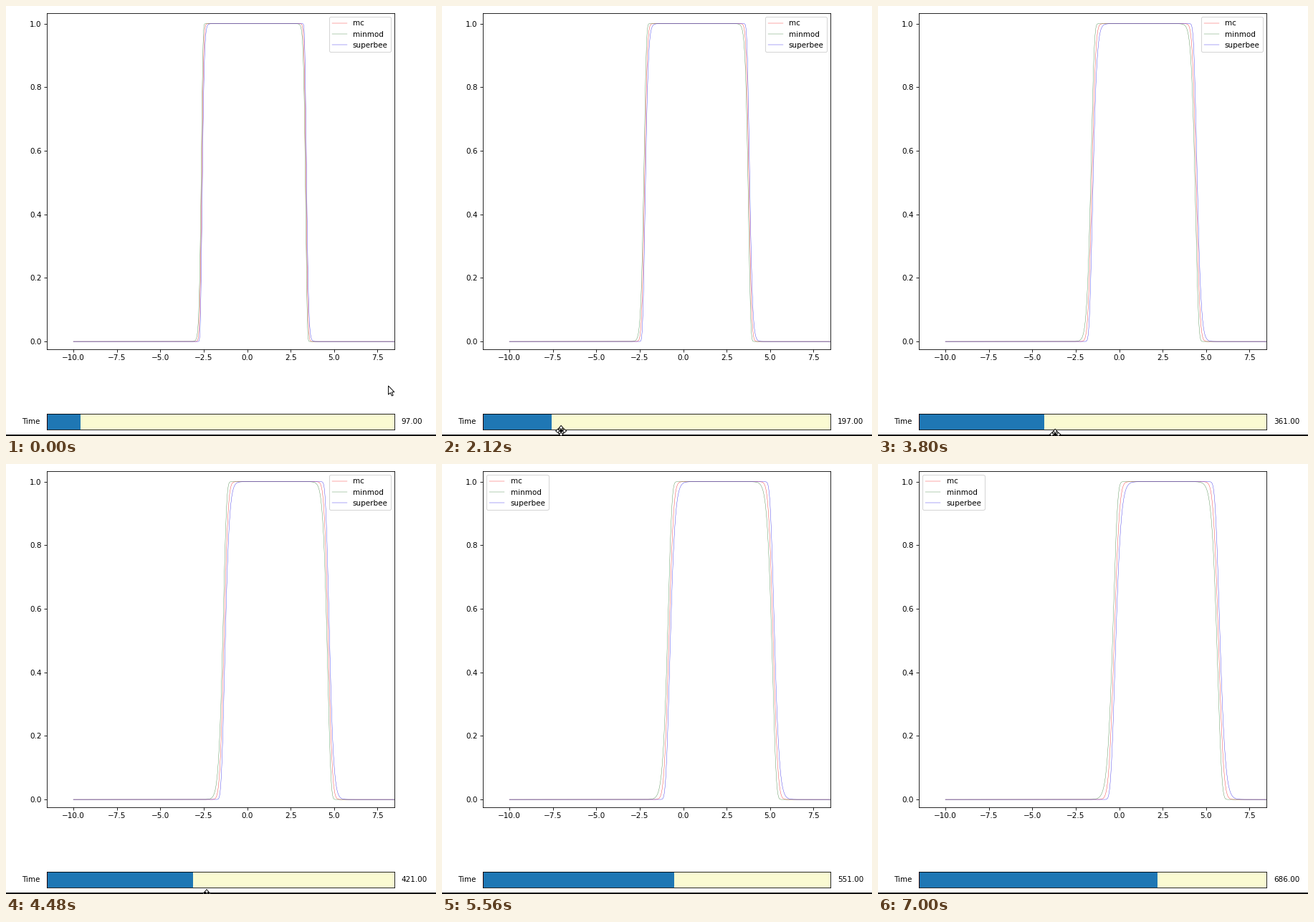
These frames come from a looping animation (600 px wide and 600 px high, 7080 ms). A matplotlib script:

```python
import numpy as np
import matplotlib.pyplot as plt
from matplotlib.animation import FuncAnimation
from matplotlib.patches import Polygon, Rectangle

STEP = 40
FRAMES = 177
SIZE = 600
GRAB, DRAG, LEAVE = 1100, 1360, 5300  # pointer events in ms

SKEW, SHIFT = 0.22, 0.4

ARROW = np.array([(0, 0), (0, 12.2), (2.8, 9.6), (4.9, 14), (6.7, 13.2),
                  (4.7, 8.9), (8.4, 8.7)])
ARM = np.array([(1.1, -1.1), (1.1, -3.6), (3.3, -3.6), (0, -7.6),
                (-3.3, -3.6), (-1.1, -3.6)])
TURN = np.array([(0, 1), (-1, 0)])
MOVE = np.vstack([ARM @ np.linalg.matrix_power(TURN, k) for k in range(4)])


def even(z):
    """Normal distribution function, closed-form approximation."""
    q = z * z / 2
    tail = np.exp(-q * (4 / np.pi + 0.147 * q) / (1 + 0.147 * q))
    return 0.5 * (1 + np.sign(z) * np.sqrt(1 - tail))


def late(z):
    """Step with a sharp foot and a soft shoulder."""
    return even(np.log(np.maximum(1 + SKEW * (z - SHIFT), 1e-3)) / SKEW)


def early(z):
    return 1 - late(-z)


def pulse(step, n):
    start = -3 + 0.00395 * n
    width = 0.009 * np.sqrt(n)
    return step((x - start) / width) - step((x - start - 6) / width)


def slider_value(t):
    if t < GRAB:
        return 97
    return round(np.interp(t, [DRAG, 2120, 3160, 4480, 5560, 7000],
                           [103, 197, 305, 421, 551, 686]))


def pointer_at(t):
    if t > DRAG:
        s = (t - DRAG) / 3120
        return 129.5 + 150.5 * s, 592.4 + 8.8 * s * s
    s = 1 - (1 - t / DRAG) ** 1.5
    weights = (1 - s) ** 3, 3 * s * (1 - s) ** 2, 3 * s * s * (1 - s), s ** 3
    return weights @ np.array([(533.5, 530), (420, 390), (120, 470), (129.5, 592.4)])


def over_axes(px, py):
    return 57 <= px <= 542 and (10 <= py <= 479 or py >= 569)


def box(left, top, right, bottom):
    return [left / SIZE, 1 - bottom / SIZE,
            (right - left) / SIZE, (bottom - top) / SIZE]


fig = plt.figure(figsize=(8, 8), dpi=75, facecolor="white")

ax = fig.add_axes(box(57, 10.1, 542.1, 479.1))
ax.set_xlim(-11.526, 8.474)
ax.set_ylim(-0.0248, 1.0329)
x = np.linspace(-10, 10, 800)
curves = []
for label, color, step in (("mc", "#f52020", even),
                           ("minmod", "#3c803c", early),
                           ("superbee", "#2a1ee6", late)):
    line, = ax.plot(x, pulse(step, 97), color=color, lw=0.37, label=label)
    curves.append((line, step))
ax.legend(loc="best")

bar = fig.add_axes(box(57, 569.1, 542.1, 591.1), facecolor="lightgoldenrodyellow")
bar.set(xlim=(0, 1000), ylim=(0, 1), xticks=[], yticks=[])
fill = bar.add_patch(Rectangle((0, 0), 97, 1, fc="#1f77b4", ec="none"))
bar.axvline(0, color="red", lw=1.5)
bar.text(-0.02, 0.5, "Time", transform=bar.transAxes, ha="right", va="center")
readout = bar.text(1.02, 0.5, "97.00", transform=bar.transAxes,
                   ha="left", va="center")

top = fig.add_axes([0, 0, 1, 1])
top.set(xlim=(0, SIZE), ylim=(SIZE, 0))
top.axis("off")
top.add_patch(Rectangle((0, 598.2), SIZE, 3, fc="black", ec="none"))
pointer = top.add_patch(Polygon(ARROW, fc="white", ec="black", lw=0.9,
                                joinstyle="miter"))


def update(i):
    t = i * STEP
    n = slider_value(t)
    for line, step in curves:
        line.set_ydata(pulse(step, n))
    fill.set_width(n)
    readout.set_text(f"{n:.2f}")
    spot = pointer_at(t)
    pointer.set_xy((MOVE if over_axes(*spot) else ARROW) + spot)
    pointer.set_visible(t < LEAVE)
    return []


anim = FuncAnimation(fig, update, frames=FRAMES, interval=STEP,
                     repeat=True, repeat_delay=0, blit=False)
plt.show()
```
